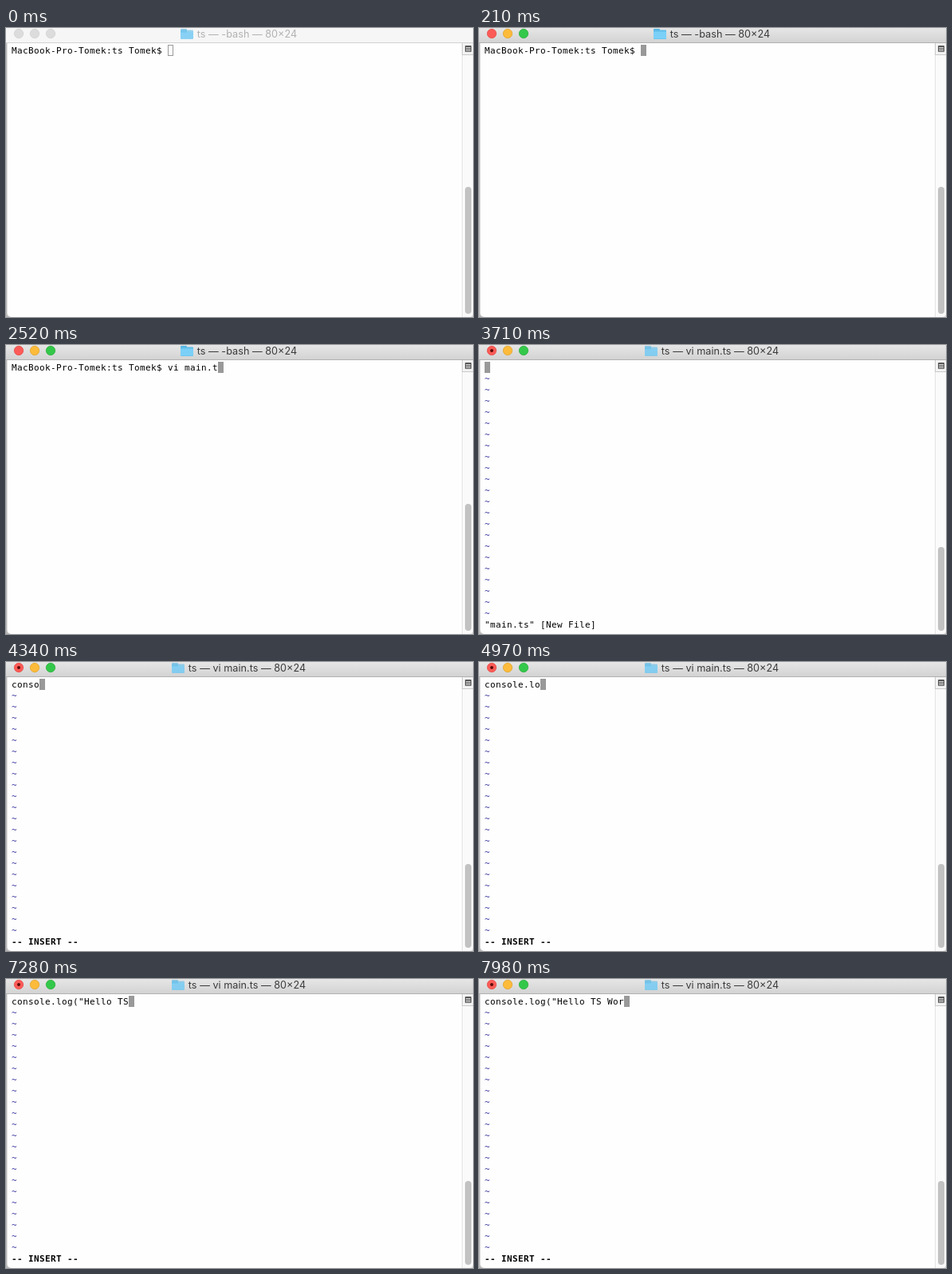
An HTML page with a canvas that plays this animation: 586x362 px, repeating every 8000 ms.

```html
<!DOCTYPE html>
<html lang="en">
<head>
<meta charset="utf-8">
<title>Terminal</title>
<style>
html, body { margin: 0; width: 100%; height: 100%; overflow: hidden; background: #fff; }
canvas { display: block; }
</style>
</head>
<body>
<canvas id="stage" width="586" height="362"></canvas>
<script>
const ctx = document.getElementById('stage').getContext('2d');
const W = 586, H = 362, LOOP = 8000;
const CELL_W = 7, CELL_H = 14, LEFT = 7, TOP = 21;
const PROMPT = 'MacBook-Pro-Tomek:ts Tomek$ ';
const ACTIVATE = 70, ENTER = 2870, EDITOR = 2940, INSERT = 3780;

// Each key is shown from its own time on.
const command = {
  text: 'vi main.ts',
  times: [770, 910, 1050, 1890, 2030, 2100, 2100, 2310, 2520, 2660]
};
const code = {
  text: 'console.log("Hello TS Wor',
  times: [3920, 4060, 4200, 4270, 4340, 4480, 4620, 4690, 4830, 4970, 5110, 5250, 5600,
    6300, 6580, 6650, 6790, 6930, 7000, 7140, 7280, 7420, 7490, 7700, 7840]
};
const typed = (line, t) => line.text.slice(0, line.times.filter(k => k <= t).length);

function rect(x, y, w, h, fill) {
  ctx.fillStyle = fill;
  ctx.fillRect(x, y, w, h);
}

function round(x, y, w, h, r, fill) {
  ctx.fillStyle = fill;
  ctx.beginPath();
  ctx.roundRect(x, y, w, h, r);
  ctx.fill();
}

function circle(x, y, r, fill, stroke) {
  ctx.beginPath();
  ctx.arc(x, y, r, 0, 7);
  ctx.fillStyle = fill;
  ctx.fill();
  if (stroke) {
    ctx.strokeStyle = stroke;
    ctx.lineWidth = 0.7;
    ctx.stroke();
  }
}

// Terminal text sits on a fixed grid, one glyph per cell.
function print(row, text, color = '#000', weight = 'normal') {
  ctx.font = `${weight} 11px "DejaVu Sans Mono", monospace`;
  ctx.textAlign = 'left';
  ctx.fillStyle = color;
  [...text].forEach((ch, i) => ctx.fillText(ch, LEFT + i * CELL_W, TOP + row * CELL_H + 11));
}

function cursor(row, col, solid = true) {
  const x = LEFT + col * CELL_W, y = TOP + row * CELL_H;
  if (solid) return rect(x, y, CELL_W, CELL_H, '#999');
  ctx.strokeStyle = '#999';
  ctx.lineWidth = 1;
  ctx.strokeRect(x + 0.5, y + 0.5, CELL_W - 1, CELL_H - 1);
}

function folder(x, alpha) {
  ctx.globalAlpha = alpha;
  round(x, 1, 8, 5, 1, '#55b5e3');
  round(x, 2.5, 16, 11.5, 1, '#5fbde9');
  round(x, 4.5, 16, 9, 1, '#7bd0f8');
  ctx.globalAlpha = 1;
}

function titleBar(active, editing) {
  const shade = ctx.createLinearGradient(0, 0, 0, 18);
  shade.addColorStop(0, active ? '#e6e6e6' : '#f6f6f6');
  shade.addColorStop(1, active ? '#d3d3d3' : '#f6f6f6');
  rect(0, 0, W, 18, shade);
  rect(0, 18, W, 1, active ? '#b1b1b1' : '#d2d2d2');

  const fills = active ? ['#fc5b57', '#fdbb3b', '#34c84a'] : Array(3).fill('#dcdcdc');
  const rims = active ? ['#e2463f', '#dfa023', '#27aa35'] : Array(3).fill('#cfcfcf');
  fills.forEach((fill, i) => circle(16 + 20 * i, 7, 5.7, fill, rims[i]));
  if (editing) circle(16, 7, 2, '#5c0a08');

  folder(editing ? 208 : 219, editing || !active ? 0.6 : 1);
  ctx.font = '12.7px Inter, sans-serif';
  ctx.textAlign = 'center';
  ctx.fillStyle = active ? '#3c3c3c' : '#b2b2b2';
  ctx.fillText(`ts — ${editing ? 'vi main.ts' : '-bash'} — 80×24`, 302.5, 12);
}

function scrollBar(thumbTop) {
  rect(572, 19, 14, H - 19, '#fafafa');
  rect(572, 19, 1, H - 19, '#e3e3e3');
  rect(572, 19, 14, 15, '#c9c9c9');
  rect(573, 19, 13, 14, '#f3f3f3');
  round(576, 22, 8, 8, 1, '#555');
  [24, 26, 28].forEach(y => rect(577, y, 6, 1, '#ddd'));
  round(576, thumbTop, 8, 358 - thumbTop, 4, '#c2c2c2');
}

function shell(t, active) {
  const line = PROMPT + typed(command, t);
  print(0, line);
  if (t < ENTER) cursor(0, line.length, active);
  else cursor(1, 0);
}

function editor(t) {
  const line = typed(code, t);
  print(0, line);
  cursor(0, line.length);
  for (let row = 1; row < 23; row++) print(row, '~', '#3a36a0');
  if (t < INSERT) print(23, '"main.ts" [New File]');
  else print(23, '-- INSERT --', '#000', 'bold');
}

function draw(t) {
  const active = t >= ACTIVATE, editing = t >= EDITOR;
  rect(0, 0, W, H, '#b8b8b8');
  round(1, 0, W + 8, H, [0, 0, 0, 5], '#dedede');
  round(2, 0, W - 2, H, [0, 0, 5, 5], '#fefefe');
  if (editing) editor(t);
  else shell(t, active);
  ctx.save();
  ctx.beginPath();
  ctx.roundRect(0, 0, W, H, [0, 0, 5, 5]);
  ctx.clip();
  scrollBar(editing ? 253 : 199);
  ctx.restore();
  titleBar(active, editing);
}

function frame() {
  draw(performance.now() % LOOP);
  requestAnimationFrame(frame);
}
frame();
</script>
</body>
</html>
```
